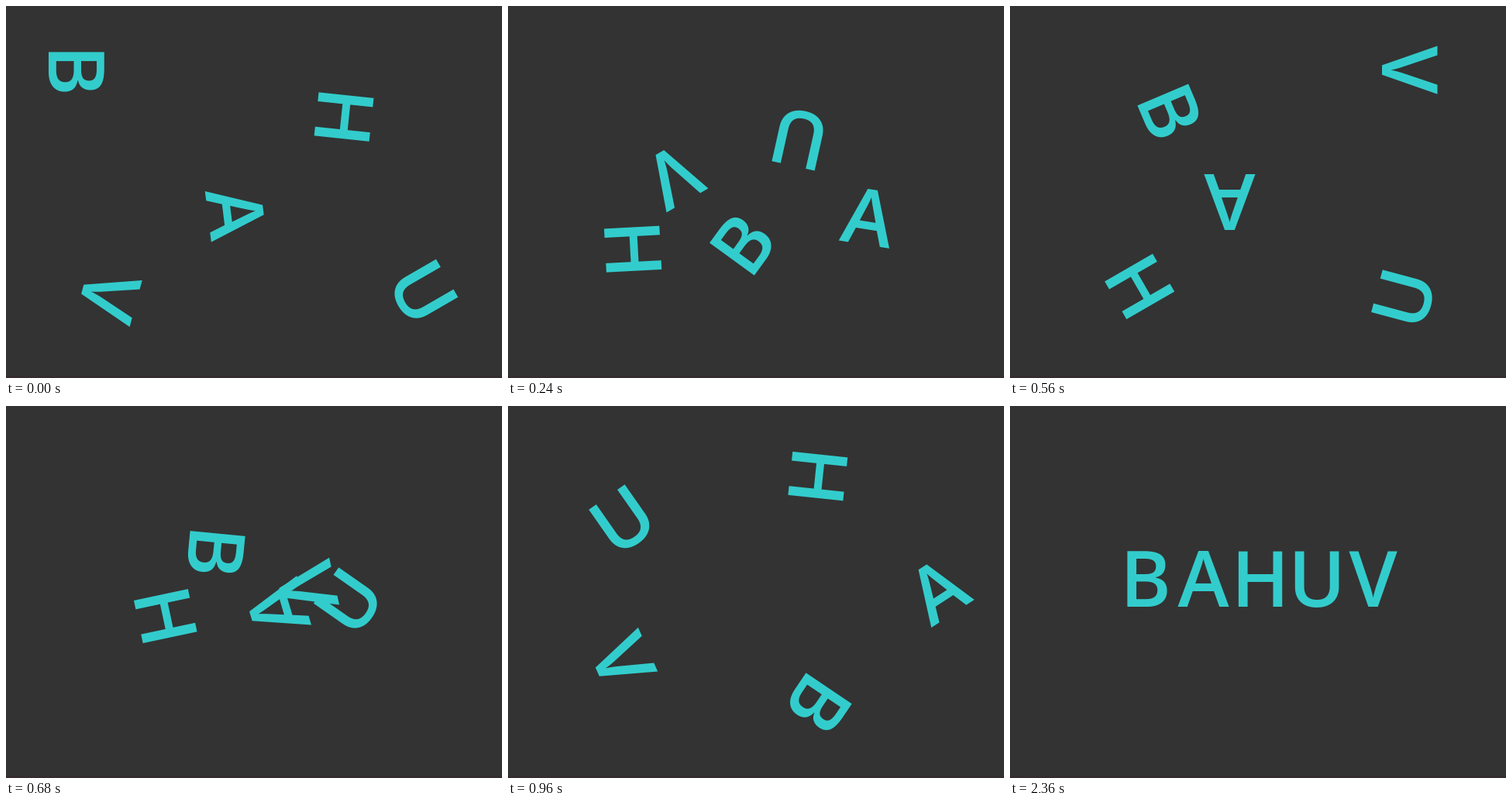
Animation, 640 px wide and 480 px high, one loop 2400 ms. Source, as an HTML page with a canvas:

```html
<!DOCTYPE html>
<html lang="en">
<head>
<meta charset="utf-8">
<title>Tumbling letters</title>
<style>
  html, body { margin: 0; height: 100%; overflow: hidden; background: #333; }
  canvas { display: block; }
</style>
</head>
<body>
<canvas id="stage" width="640" height="480"></canvas>
<script>
const ctx = document.getElementById('stage').getContext('2d');
const STEP = 40, STEPS = 60, CAP = 71;
const KEYS = [0, 4, 9, 14, 20, 24, 29];

// Scattered poses: centre x, centre y, degrees
const scatter = {
  B: [[90, 85, 90], [193, 252, -60], [471, 387, -45], [207, 138, 67], [334, 242, 124]],
  A: [[296, 268, 83], [505, 373, 75], [406, 122, -90], [283, 252, -180], [418, 269, -33]],
  H: [[436, 143, 96], [200, 438, 75], [102, 127, 105], [167, 362, 60], [244, 180, 96]],
  U: [[538, 369, 60], [418, 170, 171], [313, 173, 225], [508, 377, 285], [377, 127, 325]],
  V: [[133, 375, 105], [230, 132, 90], [188, 352, 240], [515, 83, 90], [262, 385, 66]]
};

// After the scatter: out onto a ring, then home into the word
const letters = Object.entries(scatter).map(([char, poses], i) => {
  const turn = (1 - i) * Math.PI * 2 / 5;
  const tilt = poses.at(-1)[2];
  const ring = [330 + 225 * Math.cos(turn), 238 + 155 * Math.sin(turn), tilt];
  const home = [177 + 73 * i, 223.5, Math.round(tilt / 360) * 360];
  return { char, poses: [...poses, ring, home] };
});

function poseAt(poses, step) {
  const next = KEYS.findIndex(key => key > step);
  if (next < 0) return poses.at(-1);
  const k = (step - KEYS[next - 1]) / (KEYS[next] - KEYS[next - 1]);
  return poses[next - 1].map((v, n) => v + (poses[next][n] - v) * k);
}

function drawLetter({ char, poses }, step) {
  const [x, y, angle] = poseAt(poses, step);
  const box = ctx.measureText(char);
  ctx.save();
  ctx.translate(x, y);
  ctx.rotate(angle * Math.PI / 180);
  ctx.fillText(char, (box.actualBoundingBoxLeft - box.actualBoundingBoxRight) / 2, CAP / 2);
  ctx.restore();
}

function draw(now) {
  const step = Math.floor(now / STEP) % STEPS;
  ctx.fillStyle = '#333';
  ctx.fillRect(0, 0, 640, 480);
  ctx.fillStyle = '#352d31';
  ctx.fillRect(0, 477, 640, 3);
  ctx.fillStyle = '#3cc';
  ctx.font = '560 100px "Open Sans", sans-serif';
  letters.forEach(letter => drawLetter(letter, step));
}

let start;
function tick(now) {
  start ??= now;
  draw(now - start);
  requestAnimationFrame(tick);
}
requestAnimationFrame(tick);
</script>
</body>
</html>
```
